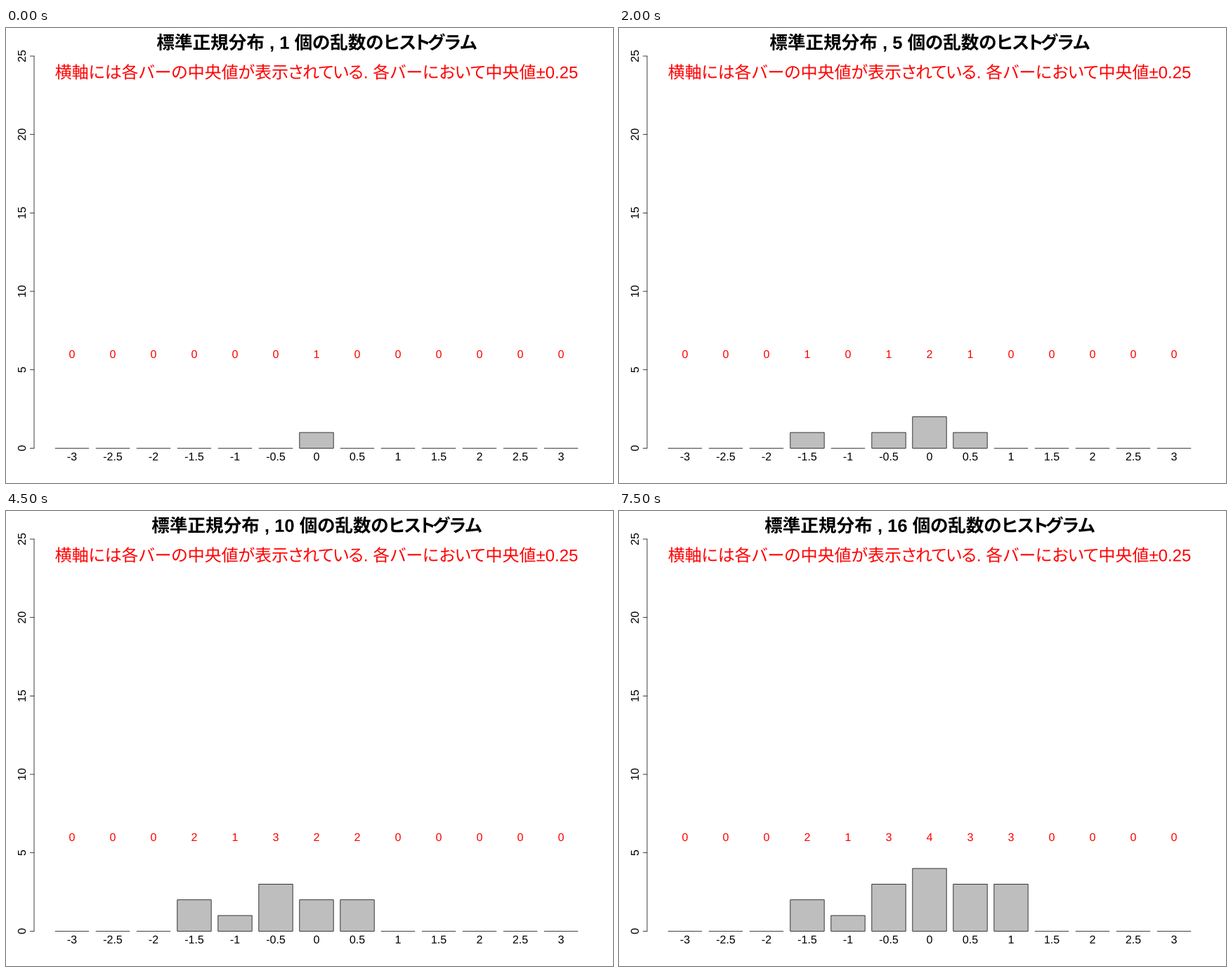
A matplotlib script for the animation above (8 s loop, 864 by 648 pixels).

```python
import matplotlib.pyplot as plt
from matplotlib.animation import FuncAnimation
from matplotlib.patches import PathPatch, Rectangle
from matplotlib.path import Path
from matplotlib.textpath import TextPath
from matplotlib.transforms import Affine2D

W, H = 864, 648
LEFT, RIGHT, TOP, BASE = 40, 844, 40, 598.4
Y_MAX = 25
UNIT = (RIGHT - LEFT) / (15.4 * 1.08)     # one bar width
FIRST = LEFT + 15.4 * 0.04 * UNIT         # left edge of the first bar
LINE = 0.75

# Bin (0..12, meaning -3..3) hit by each successive random number
DRAWS = [6, 6, 3, 5, 7, 7, 4, 5, 3, 5, 8, 8, 6, 8, 7, 6]
BINS = 13

NARROW = "さされているヒスグラム"
LATIN = {" ": 0.278, ".": 0.278, ",": 0.278, "-": 0.333, "±": 0.549}

fig = plt.figure(figsize=(W / 72, H / 72), dpi=72, facecolor="white")
ax = fig.add_axes([0, 0, 1, 1])
ax.set_xlim(0, W)
ax.set_ylim(H, 0)
ax.axis("off")


def is_cjk(ch):
    return ord(ch) > 0x2FFF


def advance(ch):
    """Width of a character in ems, with proportional kana."""
    if not is_cjk(ch):
        return LATIN.get(ch, 0.556)
    if ch == "ト":
        return 0.72
    if ch in NARROW:
        return 0.89
    return 0.975 if ord(ch) < 0x3100 else 1.0


def text_path(s, x, y, size, weight="normal", angle=0):
    """Outline of s, centred on x with its baseline at y."""
    pen = -sum(map(advance, s)) * size / 2
    glyphs = []
    for ch in s:
        step = advance(ch)
        if ch != " ":
            cjk = is_cjk(ch)
            family = "Noto Sans CJK JP" if cjk else "Liberation Sans"
            shift = (step - 1) / 2 * size if cjk else 0
            glyphs.append(TextPath((pen + shift, 0), ch, size=size,
                                   prop={"family": family, "weight": weight}))
        pen += step * size
    place = Affine2D().scale(1, -1).rotate_deg(-angle).translate(x, y)
    return Path.make_compound_path(*glyphs).transformed(place)


def add_text(*args, color="black", **kw):
    patch = PathPatch(text_path(*args, **kw), facecolor=color, linewidth=0)
    return ax.add_patch(patch)


def add_line(xs, ys):
    ax.plot(xs, ys, color="black", lw=LINE, snap=False, solid_capstyle="round")


def y_px(value):
    return BASE - value * (BASE - TOP) / Y_MAX


def bar_left(i):
    return FIRST + 1.2 * i * UNIT


def bar_mid(i):
    return bar_left(i) + UNIT / 2


add_line([LEFT, LEFT], [TOP, BASE])
for v in range(0, Y_MAX + 1, 5):
    add_line([LEFT - 5.8, LEFT], [y_px(v)] * 2)
    add_text(str(v), 28, y_px(v), 16, angle=90)

bars = []
for i in range(BINS):
    bars.append(ax.add_patch(Rectangle(
        (bar_left(i), BASE), UNIT, 0, facecolor="#bebebe",
        edgecolor="black", linewidth=LINE, snap=False)))
    add_text(f"{(i - 6) / 2:g}", bar_mid(i), 615.8, 16)

add_text("横軸には各バーの中央値が表示されている. 各バーにおいて中央値±0.25",
         (LEFT + RIGHT) / 2, 71.5, 24, color="red")


def title_path(n):
    return text_path(f"標準正規分布 , {n} 個の乱数のヒストグラム",
                     (LEFT + RIGHT) / 2, 29.7, 25.6, weight="bold")


def count_path(i, n):
    return text_path(str(n), bar_mid(i), 470, 16)


title = ax.add_patch(PathPatch(title_path(1), facecolor="black", linewidth=0))
labels = [ax.add_patch(PathPatch(count_path(i, 0), facecolor="red", linewidth=0))
          for i in range(BINS)]


def update(frame):
    drawn = DRAWS[:frame + 1]
    title.set_path(title_path(len(drawn)))
    for i, (bar, label) in enumerate(zip(bars, labels)):
        n = drawn.count(i)
        bar.set_height(y_px(n) - BASE)
        label.set_path(count_path(i, n))
    return [title, *bars, *labels]


anim = FuncAnimation(fig, update, frames=len(DRAWS), interval=500,
                     repeat=True, repeat_delay=0, blit=False)
plt.show()
```
